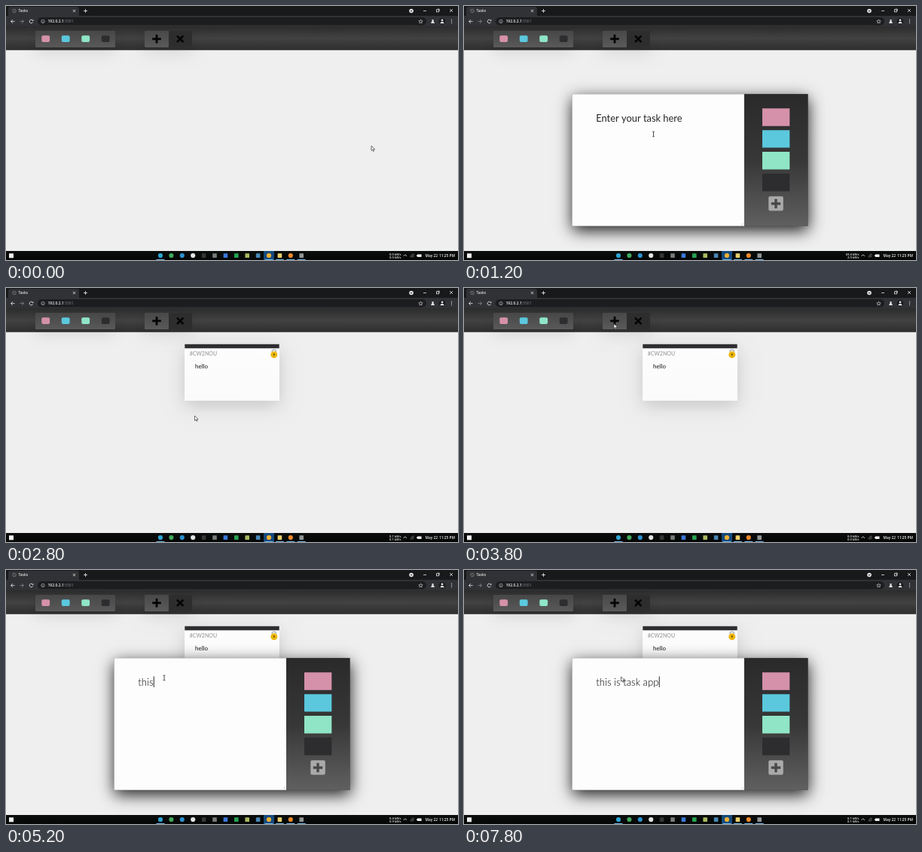
An HTML page with a canvas for the animation above (8 s loop, 600 px wide and 338 px high).

```html
<!DOCTYPE html>
<html lang="en">
<head>
<meta charset="utf-8">
<title>Tasks</title>
<style>
  html, body { margin: 0; width: 100%; height: 100%; overflow: hidden; background: #000; }
  canvas { display: block; width: 600px; height: 338px; }
</style>
</head>
<body>
<canvas id="stage" width="600" height="338"></canvas>
<script>
const ctx = document.getElementById('stage').getContext('2d');
const LOOP = 8000, STEP = 200;
const SWATCHES = ['#d591aa', '#5bc8dd', '#8fe5c6', '#2d2d2f'];

// Each track lists [start time, value].
const MODAL = [[0, false], [1000, true], [2800, false], [4000, true]];
const SPEED = [
  [0, ['0.0', '0.0']], [1000, ['69.4', '2.0']], [2000, ['0.1', '0.1']],
  [3800, ['0.0', '0.0']], [5000, ['0.4', '0.9']], [6000, ['0.0', '0.0']], [7000, ['0.1', '0.1']]
];
const CURSOR = [[0, 'arrow'], [1200, 'beam'], [2800, 'arrow'], [4200, 'beam'], [7400, 'arrow']];

// One letter per step from start; a pause holds the text for one step.
const TYPING = [
  { start: 1600, end: 2800, text: 'hello' },
  { start: 4600, end: LOOP, text: 'this is task app', pause: 6600 }
];

// Each leg eases the pointer from its previous position to `to`.
const POINTER_START = [485, 186];
const LEGS = [
  { from: 0, until: 800, to: [200, 48] },
  { from: 1000, until: 1200, to: [251.5, 170.5] },
  { from: 2600, until: 2800, to: [250.5, 170] },
  { from: 3000, until: 3800, to: [199, 47.5] },
  { from: 3800, until: 4000, to: [198.5, 55] },
  { from: 4000, until: 4200, to: [208.5, 142] },
  { from: 4200, until: 4400, to: [210, 143.5] },
  { from: 7200, until: 7400, to: [208.5, 142] }
];

const at = (track, t) => track.filter(([start]) => start <= t).pop()[1];

function typedAt(t) {
  const run = TYPING.find(r => t >= r.start && t < r.end);
  if (!run) return null;
  const held = t >= run.pause ? 1 : 0;
  return run.text.slice(0, (t - run.start) / STEP + 1 - held);
}

function pointerAt(t) {
  let pos = POINTER_START;
  for (const { from, until, to } of LEGS) {
    const p = Math.min(1, Math.max(0, (t - from) / (until - from)));
    const eased = p * p * (3 - 2 * p);
    pos = pos.map((v, i) => v + (to[i] - v) * eased);
  }
  return pos;
}

function rect(x, y, w, h, fill, radius = 0) {
  ctx.fillStyle = fill;
  ctx.beginPath();
  ctx.roundRect(x, y, w, h, radius);
  ctx.fill();
}

function circle(x, y, r, fill) {
  ctx.fillStyle = fill;
  ctx.beginPath();
  ctx.arc(x, y, r, 0, Math.PI * 2);
  ctx.fill();
}

function ring(x, y, r, color, width = 0.7, from = 0, to = Math.PI * 2) {
  ctx.strokeStyle = color;
  ctx.lineWidth = width;
  ctx.beginPath();
  ctx.arc(x, y, r, from, to);
  ctx.stroke();
}

function line(points, color, width = 0.8) {
  ctx.strokeStyle = color;
  ctx.lineWidth = width;
  ctx.beginPath();
  points.forEach(([x, y]) => ctx.lineTo(x, y));
  ctx.stroke();
}

function poly(points, fill) {
  ctx.fillStyle = fill;
  ctx.beginPath();
  points.forEach(([x, y]) => ctx.lineTo(x, y));
  ctx.fill();
}

function text(str, x, y, font, color, align = 'left') {
  ctx.font = font;
  ctx.fillStyle = color;
  ctx.textAlign = align;
  ctx.fillText(str, x, y);
  return ctx.measureText(str).width;
}

function vertical(y0, y1, ...colors) {
  const g = ctx.createLinearGradient(0, y0, 0, y1);
  colors.forEach((c, i) => g.addColorStop(i / (colors.length - 1), c));
  return g;
}

function shadowed(color, blur, dy, draw) {
  ctx.save();
  ctx.shadowColor = color;
  ctx.shadowBlur = blur;
  ctx.shadowOffsetY = dy;
  draw();
  ctx.restore();
}

function cross(x, y, r, color, width) {
  line([[x - r, y - r], [x + r, y + r]], color, width);
  line([[x + r, y - r], [x - r, y + r]], color, width);
}

function plus(x, y, r, color, width) {
  line([[x - r, y], [x + r, y]], color, width);
  line([[x, y - r], [x, y + r]], color, width);
}

function drawBrowser() {
  const ui = '5px "Open Sans", sans-serif', pale = '#e4e5e7';
  rect(0, 0, 600, 14, '#18191b');
  rect(3, 1, 94, 14, '#313235', [3, 3, 0, 0]);
  rect(0, 13, 600, 14, '#313235');
  rect(42, 15, 516, 10.5, '#1c1d1f', 5.2);

  ring(11, 6.5, 2.3, '#85878a');
  line([[9.5, 5], [12.5, 8]], '#85878a', 0.6);
  text('Tasks', 16.5, 8.3, '600 4.8px "Open Sans", sans-serif', pale);
  cross(90.5, 6.5, 1.6, pale, 0.9);
  plus(105.5, 6.5, 2.4, pale, 0.9);

  circle(538, 6.5, 2.8, '#e4e4e4');
  poly([[536.7, 6], [539.3, 6], [538, 7.7]], '#222');
  line([[554, 6.5], [558, 6.5]], pale, 0.8);
  ctx.strokeRect(571.4, 4.8, 3, 3);
  line([[572.6, 4], [575.4, 4], [575.4, 6.8]], pale, 0.6);
  cross(591, 6, 2, pale, 0.8);

  line([[11.5, 20.5], [6.5, 20.5]], pale);
  line([[9, 18], [6.5, 20.5], [9, 23]], pale);
  line([[18.5, 20.5], [23.5, 20.5]], '#85878a');
  line([[21, 18], [23.5, 20.5], [21, 23]], '#85878a');
  ring(33.5, 20.5, 2.3, pale, 0.9, 0.4, 5.5);
  poly([[34.4, 20], [36.4, 20], [36.4, 17.8]], pale);
  ring(49, 20.5, 2.2, '#b9bbbe', 0.7);
  line([[49, 20], [49, 21.8]], '#b9bbbe', 0.7);
  const host = text('192.0.2.1', 55.5, 22.3, '600 5px "Open Sans", sans-serif', '#f2f3f4');
  text(':5501', 55.5 + host, 22.3, ui, '#85888c');

  const star = Array.from({ length: 11 }, (_, i) => {
    const a = -Math.PI / 2 + i * Math.PI / 5, r = i % 2 ? 1.3 : 2.8;
    return [550.5 + r * Math.cos(a), 20.7 + r * Math.sin(a)];
  });
  line(star, pale, 0.6);
  poly([[565.5, 18], [567.5, 18], [567.5, 20], [569, 23], [564, 23], [565.5, 20]], '#e4e4e4');
  circle(579, 20.5, 4.3, '#18191b');
  circle(579, 18.9, 1.4, pale);
  rect(576.5, 21, 5, 2.2, pale, [2, 2, 0, 0]);
  [18.2, 20.4, 22.6].forEach(y => circle(591.5, y, 0.6, pale));
}

function drawHeader() {
  rect(0, 27, 600, 31.7, vertical(27, 59, '#2c2c2c', '#424242', '#2d2d2d'));
  shadowed('rgba(0,0,0,.1)', 20, 7, () => {
    rect(39, 33, 106, 22, vertical(33, 55, '#474747', '#595959'), 1);
    rect(184, 33, 63, 22, '#2d2d2d', 1);
  });
  SWATCHES.forEach((c, i) => rect(47.3 + i * 26.5, 39.3, 10.8, 8.7, c, 2));
  rect(184, 33, 32, 22, vertical(33, 55, '#484848', '#5a5a5a'), 1);
  plus(200, 43.8, 5.8, '#050505', 2.8);
  cross(231.2, 43.8, 4.2, '#050505', 2.6);
}

function drawTaskbar(speed) {
  rect(0, 326, 600, 12, vertical(326, 338, '#0b0e0c', '#050606'));
  rect(4, 329.3, 6, 6, '#f2f2f2');
  rect(342, 326, 14, 12, '#164a7c');
  ['#2ba5d3', '#3fa95b', '#2b91cf', '#e3e5e5', '#343536', '#777b7c', '#3978d8',
    '#25a451', '#a8b960', '#4787b5', '#efb033', '#ead06b', '#ef8928', '#909595'
  ].forEach((color, i) => {
    const x = 205 + i * 14.4;
    if ([0, 1, 2, 3, 10, 12].includes(i)) circle(x, 332, 3.1, color);
    else rect(x - 2.8, 329.3, 5.6, 5.6, color, 0.5);
    if (i === 0 || i > 9) rect(x - 5.5, 337, 11, 1, '#75b7e5');
  });

  const small = '600 4.1px "Open Sans", sans-serif', white = '#f0f0f0';
  speed.forEach((v, i) => text(v + ' kB/s', 524.5, 331.6 + i * 4.8, small, white, 'right'));
  line([[527.5, 333], [529.7, 330.8], [532, 333]], white, 0.8);
  [1.5, 3, 4.5].forEach(r => ring(541.5, 334.5, r, '#858585', 0.7, Math.PI, Math.PI * 1.5));
  rect(546, 330.5, 5.5, 3.5, white);
  rect(545, 331.4, 1, 1.6, white);
  const clock = '600 4.8px "Open Sans", sans-serif';
  text('May 22', 556.5, 333.8, clock, white);
  text('11:25 PM', 575, 333.8, clock, white);
}

function drawCard() {
  shadowed('rgba(0,0,0,.17)', 22, 7, () => rect(237.3, 74.7, 125.4, 75.3, '#fff'));
  rect(237.3, 80, 125.4, 70, vertical(80, 150, '#fdfdfd', '#fafafa'));
  rect(237.3, 74.7, 125.4, 5.6, '#2e2e30');
  text('#CW2NOU', 243.8, 89.8, 'bold 7px Lato, sans-serif', '#aaa');
  text('hello', 251, 107, '8px Lato, sans-serif', '#111');
  ring(355.8, 85, 2.8, '#a9b0b4', 1.3, Math.PI, Math.PI * 2);
  circle(355.8, 88.7, 4.5, '#edb70f');
  circle(355.8, 88.3, 1, '#5b4300');
  line([[355.8, 88.3], [355.8, 90.3]], '#5b4300', 0.8);
}

function drawModal(typed, caret) {
  shadowed('rgba(0,0,0,.88)', 20, 6, () => rect(143.5, 117.3, 313, 175.5, '#444'));
  rect(143.5, 117.3, 228.5, 175.5, '#fdfdfd');
  rect(372, 117.3, 84.5, 175.5, vertical(117, 293, '#2a2a2a', '#373737', '#606060'));
  SWATCHES.forEach((c, i) => rect(396, 136.3 + i * 28.9, 36.3, 23.4, c));
  rect(404.3, 253.3, 19.5, 19.3, '#a9a9a9', 2);
  plus(414, 263, 6.2, '#484848', 3.4);
  line([[368.5, 291.5], [371, 289]], '#aaa', 0.5);

  let end = 175.5;
  if (typed === null) text('Enter your task here', 175.2, 153.6, '12.9px Lato, sans-serif', '#262626');
  else end += text(typed, 175.2, 153.6, '300 13.2px Lato, sans-serif', '#000');
  if (caret) rect(end, 141.5, 0.9, 14.5, '#111');
}

function drawPointer([x, y], kind) {
  if (kind === 'beam') {
    line([[x, y - 3.3], [x, y + 3.3]], '#222', 0.8);
    [-3.3, 3.3].forEach(d => line([[x - 1.4, y + d], [x + 1.4, y + d]], '#222', 0.7));
    return;
  }
  const shape = [[0, 0], [0, 6.4], [1.5, 5.1], [2.5, 7.4], [3.6, 6.9], [2.6, 4.7], [4.6, 4.6], [0, 0]]
    .map(([dx, dy]) => [x + dx, y + dy]);
  poly(shape, '#fff');
  line(shape, '#333', 0.7);
}

function render(t) {
  rect(0, 0, 600, 338, '#f0eff0');
  drawBrowser();
  drawHeader();
  if (t >= 2800) drawCard();
  const typed = typedAt(t);
  if (at(MODAL, t)) drawModal(typed, typed !== null);
  drawTaskbar(at(SPEED, t));
  drawPointer(pointerAt(t), at(CURSOR, t));
}

const origin = performance.now();
function tick() {
  const t = (performance.now() - origin) % LOOP;
  render(Math.floor(t / STEP) * STEP);
  requestAnimationFrame(tick);
}
tick();
</script>
</body>
</html>
```
